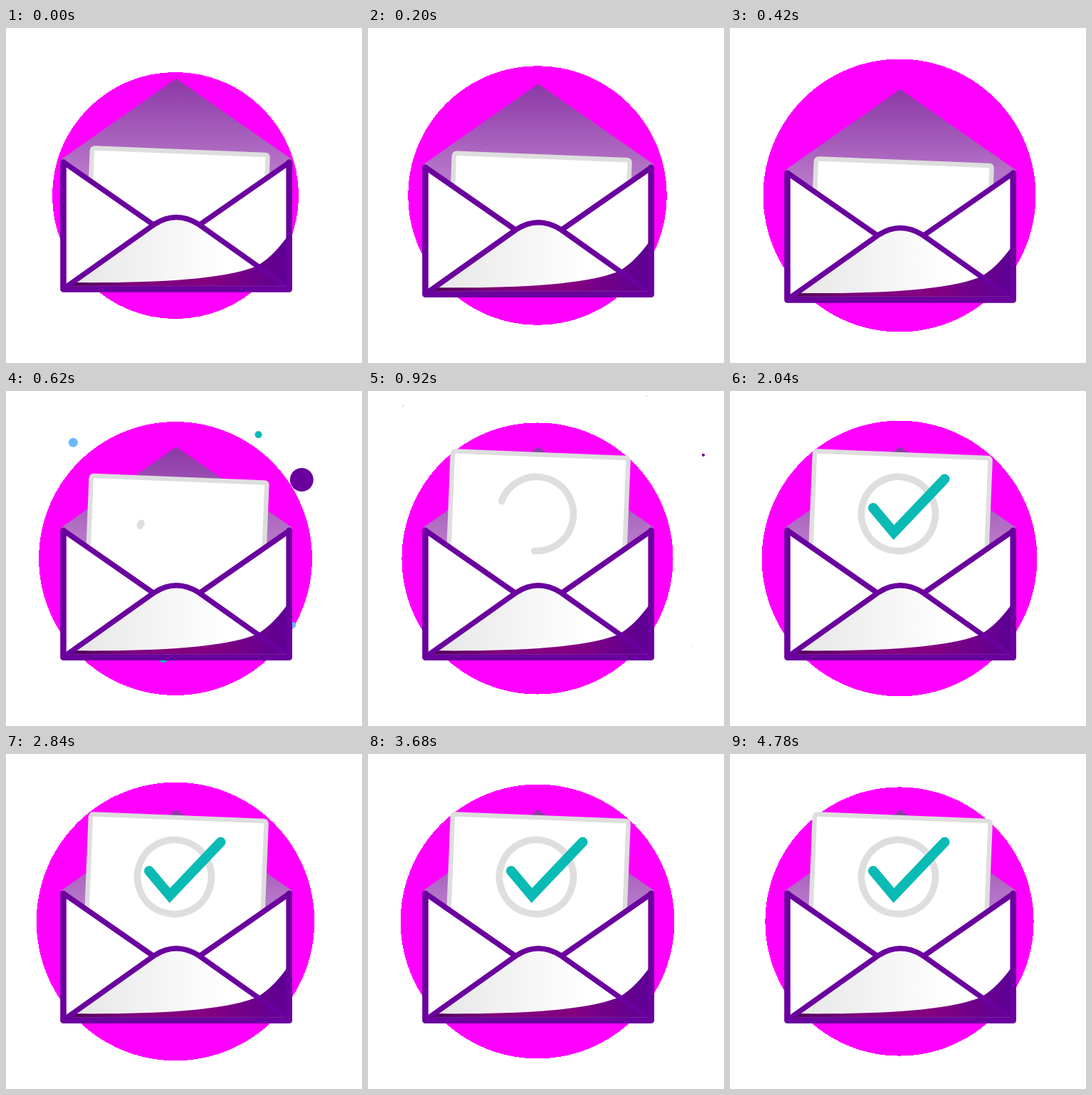
These frames come from a looping animation (500x470 px, 4800 ms). An HTML page:

```html
<!DOCTYPE html>
<html>
<head>
<meta charset="utf-8">
<style>
  html, body { margin: 0; width: 100%; height: 100%; overflow: hidden; background: #fff; }
  svg { display: block; }
</style>
</head>
<body>
<svg width="500" height="470" viewBox="0 0 500 470" fill="none">
  <defs>
    <linearGradient id="flapShade" x2="0" y2="1">
      <stop stop-color="#8c38a6"/><stop offset=".55" stop-color="#b676c8"/>
    </linearGradient>
    <linearGradient id="paperShade" gradientUnits="userSpaceOnUse" x1="90" x2="310">
      <stop stop-color="#e6e6e6"/><stop offset="1" stop-color="#fff"/>
    </linearGradient>
    <linearGradient id="waveShade">
      <stop stop-color="#480050"/><stop offset=".3" stop-color="#80007c"/>
      <stop offset=".65" stop-color="#840080"/><stop offset="1" stop-color="#5c0094"/>
    </linearGradient>
  </defs>

  <circle id="disc" cx="238" cy="235" fill="#f0f" shape-rendering="crispEdges"/>
  <g id="burst"></g>
  <path id="flap" d="M239 71L401 184V190L239 300L78 190V184Z" fill="url(#flapShade)"/>

  <g id="letter">
    <path transform="translate(116 81) rotate(2.3)" d="M3.2 200V7.2Q3.2 3.2 7.2 3.2H246Q250 3.2 250 7.2V192"
      fill="#fff" stroke="#dedede" stroke-width="6.5"/>
    <circle id="ring" cx="236.5" cy="172.5" r="52" transform="rotate(200 236.5 172.5)" pathLength="1"
      stroke="#dedede" stroke-width="9.5" stroke-linecap="round"/>
    <path id="check" d="M201 164L230 198.5L301.5 123.5" pathLength="1"
      stroke="#0abab5" stroke-width="14" stroke-linecap="round"/>
  </g>

  <g id="front" stroke-linejoin="round">
    <path d="M81 188.5L209 276Q239 256 270 276L398 188.5V366H81Z" fill="#fff"/>
    <path d="M82 365L209 275Q239 256 270 275L397 365Z" fill="url(#paperShade)"/>
    <path d="M92 357C200 358 300 354 350 335Q372 324 394 294V366H84Z" fill="url(#waveShade)"/>
    <g stroke="#6a009e">
      <path d="M81 188.5L207 276M398 188.5L272 276M82 365L209 275Q239 256 270 275L397 365" stroke-width="7.5"/>
      <path d="M80.5 188.5V366.5H397.7V188.5" stroke-width="8.6" stroke-linecap="round"/>
    </g>
    <path d="M94 362H393" stroke="#7c2f9c" stroke-width=".8"/>
  </g>
</svg>
<script>
const LOOP = 4800, TEAL = '#0abab5', BLUE = '#6cb8ff', PURPLE = '#6a009e';
const el = id => document.getElementById(id);
const progress = (t, from, to) => Math.min(1, Math.max(0, (t - from) / (to - from)));

// Linear interpolation through [time, value] pairs
function track(t, keys) {
  const i = Math.max(1, keys.findIndex(k => k[0] >= t));
  const [t0, v0] = keys[i - 1], [t1, v1] = keys[i];
  return v0 + (v1 - v0) * progress(t, t0, t1);
}

const discKeys = [[0, 173], [450, 192.7], [1360, 188.5], [2480, 196.5], [LOOP, 188.5]];
const dropKeys = [[0, 0], [420, 15], [600, 7.3], [LOOP, 7.3]];

// Offset from the disc centre, radius, colour
const dots = [
  [-143, -162, 6.5, BLUE], [116, -173, 5, TEAL], [176.5, -110, 16.5, PURPLE],
  [164, 93, 4.5, BLUE], [-17, 139, 6.5, TEAL]
].map(([x, y, r, fill]) => {
  const node = document.createElementNS('http://www.w3.org/2000/svg', 'circle');
  node.setAttribute('fill', fill);
  el('burst').append(node);
  return { node, x, y, r };
});

const move = (id, x, y) => el(id).setAttribute('transform', `translate(${x} ${y})`);

function reveal(id, amount, start = 0) {
  const style = el(id).style;
  style.visibility = amount > 0 ? 'visible' : 'hidden';
  style.strokeDasharray = amount < 1 ? `${amount} ${1 - amount}` : 'none';
  style.strokeDashoffset = -start;
}

function draw(t) {
  el('disc').setAttribute('r', track(t, discKeys));

  const drop = track(t, dropKeys);
  move('flap', 0, drop);
  move('front', 0, drop);

  const sunk = 1 - progress(t, 450, 725);
  move('letter', 2 * sunk, drop - 7.3 + 91.3 * sunk);
  reveal('ring', progress(t, 615, 1050));
  reveal('check', progress(t, 1040, 1497), .925);

  const spread = 1.32 * (1 - (1 - progress(t, 440, 917)) ** 3);
  const size = t < 440 ? 0 : 1 - progress(t, 790, 940);
  for (const { node, x, y, r } of dots) {
    node.setAttribute('cx', 238 + x * spread);
    node.setAttribute('cy', 235 + y * spread);
    node.setAttribute('r', r * size);
  }
}

const begin = performance.now();
function tick() {
  draw((performance.now() - begin) % LOOP);
  requestAnimationFrame(tick);
}
tick();
</script>
</body>
</html>
```
